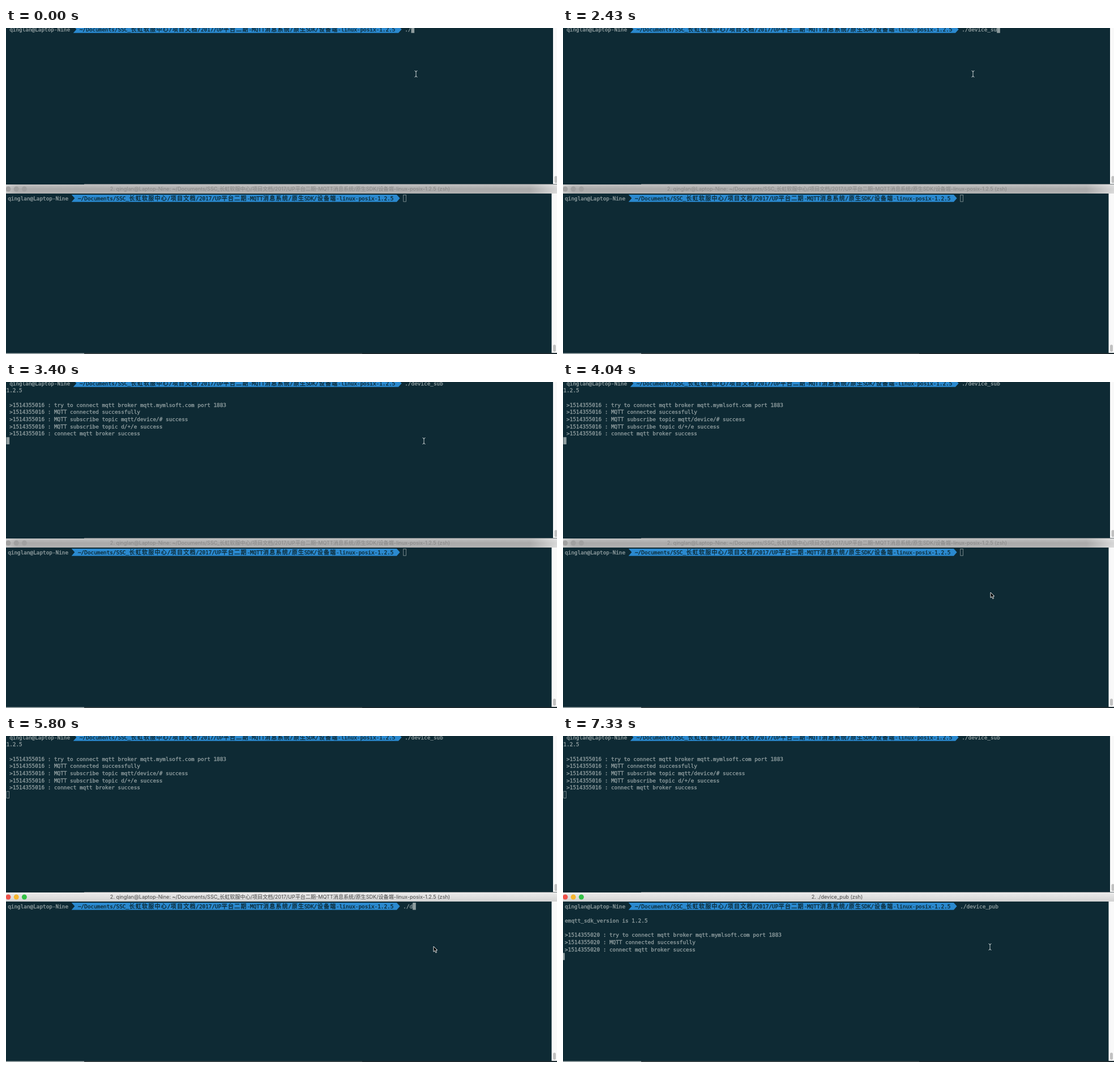
Recreate the animation shown at these times as an HTML page with a canvas. Size 973x575 px, loop 8000 ms.

```html
<!DOCTYPE html>
<html lang="en">
<head>
<meta charset="utf-8">
<title>Two terminals</title>
<style>
html, body { margin: 0; width: 100%; height: 100%; overflow: hidden; background: #0e2a34; }
canvas { display: block; }
</style>
</head>
<body>
<canvas id="stage" width="973" height="575"></canvas>
<script>
const ctx = document.getElementById('stage').getContext('2d');
const LOOP = 8000, CELL = 5.63, ROW = 12.65;
const BG = '#0e2a34', INK = '#8f9d9f', BLUE = '#2a89cf';
const USER = 'qinglan@Laptop-Nine';
const PATH = '~/Documents/SSC_长虹软服中心/项目文档/2017/UP平台二期-MQTT消息系统/原生SDK/设备端-linux-posix-1.2.5';
const COMMAND_COL = 125;

// [start time, value] steps; the latest one that has started applies
const topTyping = [[0, './'], [180, './d'], [390, './de'], [1290, './dev'], [1530, './device_'],
  [2190, './device_s'], [2430, './device_su'], [2660, './device_sub ']];
const bottomTyping = [[0, ''], [5060, '.'], [5270, './'], [5800, './d'], [5980, './de'],
  [6160, './device_'], [6460, './device_p'], [6760, './device_pu'], [6880, './device_pub ']];

const topStamp = ' >1514355016 : ', bottomStamp = ' >1514355020 : ';
const connecting = 'try to connect mqtt broker mqtt.mymlsoft.com port 1883';
const connected = 'MQTT connected successfully', ready = 'connect mqtt broker success';
// [start time, row, text]
const topOutput = [
  [3020, 1, '1.2.5'],
  [3020, 3, topStamp + connecting],
  [3110, 4, topStamp + connected],
  [3230, 5, topStamp + 'MQTT subscribe topic mqtt/device/# success'],
  [3230, 6, topStamp + 'MQTT subscribe topic d/+/e success'],
  [3230, 7, topStamp + ready]];
const bottomOutput = [
  [7180, 2, ' emqtt_sdk_version is 1.2.5'],
  [7180, 4, bottomStamp + connecting],
  [7240, 5, bottomStamp + connected],
  [7240, 6, bottomStamp + ready]];

const pointer = [[0, [724, 81]], [3400, [738, 104]], [3460, [768, 150]], [3520, [802, 186]],
  [3580, [818, 208]], [3750, [817, 224]], [3808, [811, 254]], [3866, [799, 292]],
  [3924, [780, 336]], [3982, [764, 364]], [4040, [755, 371]], [6760, [754, 372]]];

const at = (steps, t) => steps.filter(s => s[0] <= t).pop()[1];

function rect(x, y, w, h, fill) {
  ctx.fillStyle = fill;
  ctx.fillRect(x, y, w, h);
}

function polygon(points, fill, stroke) {
  ctx.beginPath();
  points.forEach(([x, y]) => ctx.lineTo(x, y));
  ctx.closePath();
  ctx.fillStyle = fill;
  ctx.fill();
  if (stroke) {
    ctx.strokeStyle = stroke;
    ctx.stroke();
  }
}

function dot(x, y, r, fill) {
  ctx.beginPath();
  ctx.arc(x, y, r, 0, 7);
  ctx.fillStyle = fill;
  ctx.fill();
}

// Text on the terminal grid, slightly thickened: wide characters take two cells
function gridText(text, x, y, color) {
  ctx.fillStyle = ctx.strokeStyle = color;
  ctx.lineWidth = 0.35;
  ctx.textAlign = 'left';
  for (const ch of text) {
    const wide = ch > '\u2e80';
    ctx.font = wide ? '10px "Noto Sans CJK SC", "Noto Sans CJK", sans-serif'
      : '9.35px "DejaVu Sans Mono", monospace';
    const left = x + (wide ? 0.5 : 0);
    ctx.fillText(ch, left, y + 9.6);
    ctx.strokeText(ch, left, y + 9.6);
    x += wide ? 2 * CELL : CELL;
  }
}

function terminal(x, y, typed, output, focused, t) {
  const left = x + 21 * CELL, right = x + 123 * CELL, mid = y + ROW / 2, bottom = y + ROW;
  gridText(USER, x + CELL, y, INK);
  polygon([[left, y], [right, y], [right + CELL, mid], [right, bottom], [left, bottom],
    [left + CELL, mid]], BLUE);
  gridText(PATH, x + 23 * CELL, y, BG);
  gridText(typed, x + COMMAND_COL * CELL, y, INK);

  const lines = output.filter(line => line[0] <= t);
  lines.forEach(([, row, text]) => gridText(text, x, y + row * ROW, INK));
  const row = lines.length ? lines.at(-1)[1] + 1 : 0;
  const col = row ? 0 : COMMAND_COL + typed.length;
  const cx = x + col * CELL, cy = y + row * ROW;
  if (focused) rect(cx, cy, CELL, ROW, INK);
  else {
    ctx.strokeStyle = INK;
    ctx.lineWidth = 0.8;
    ctx.strokeRect(cx + 0.5, cy + 0.5, CELL - 1, ROW - 1);
  }
}

function scrollbar(x, y, h, thumbX, thumbY) {
  rect(x, y, 973 - x, h, '#f9f9f9');
  ctx.fillStyle = '#c1c1c1';
  ctx.beginPath();
  ctx.roundRect(thumbX, thumbY, 5, 12.5, 2.5);
  ctx.fill();
}

function gradientBar(colors, x2, y2) {
  const shade = ctx.createLinearGradient(0, 276, x2, y2);
  colors.forEach(([stop, color]) => shade.addColorStop(stop, color));
  rect(0, 276, 973, 16, shade);
}

function titleBar(active, title) {
  if (active) gradientBar([[0, '#ececec'], [1, '#d2d2d2']], 0, 292);
  else {
    gradientBar([[0, '#c2c2c2'], [0.5, '#a9a9a9'], [1, '#b2b2b2']], 0, 292);
    gradientBar([[0, '#fff4'], [0.02, '#fff0'], [0.95, '#fff0'], [1, '#fff8']], 973, 276);
  }
  ['#f0524b', '#f6b62f', '#32c146'].forEach((color, i) =>
    dot(4 + 14.2 * i, 284, 4.5, active ? color : '#a0a0a0'));
  ctx.font = '9.1px Inter, "Noto Sans CJK SC", sans-serif';
  ctx.textAlign = 'center';
  ctx.fillStyle = active ? '#454545' : '#878787';
  ctx.fillText(title, 484, 287.4);
}

function iBeam(x, y) {
  ctx.beginPath();
  for (const s of [-1, 1]) {
    ctx.moveTo(x - 2.5, y + 5.5 * s);
    ctx.quadraticCurveTo(x, y + 5.5 * s, x, y + 3.5 * s);
    ctx.quadraticCurveTo(x, y + 5.5 * s, x + 2.5, y + 5.5 * s);
  }
  ctx.moveTo(x, y - 4);
  ctx.lineTo(x, y + 4);
  ctx.strokeStyle = '#d3dadb';
  ctx.lineWidth = 0.9;
  ctx.stroke();
}

function arrow(x, y) {
  ctx.lineWidth = 1;
  polygon([[0, 0], [0, 9.5], [2.2, 7.5], [3.9, 11.3], [5.6, 10.6], [4, 6.9], [6.8, 6.8]]
    .map(([dx, dy]) => [x + dx, y + dy]), '#000', '#e3e6e7');
}

function draw(t) {
  rect(0, 0, 973, 575, BG);
  const bottomActive = t >= 4340;
  terminal(0.5, -3.9, at(topTyping, t), topOutput, !bottomActive, t);
  terminal(-2.5, 294, at(bottomTyping, t), bottomOutput, bottomActive, t);
  scrollbar(966, 0, 275, 968.5, 261);
  scrollbar(963.5, 292, 281, 966, 558.5);
  rect(138, 275, 835, 1, '#70797c');
  titleBar(bottomActive, t < 7330 ? `2. ${USER}: ${PATH} (zsh)` : '2. ./device_pub (zsh)');
  rect(0, 573.5, 138, 1.5, '#aab2b3');
  rect(138, 573.5, 491, 1.5, '#41484a');
  rect(629, 573.5, 344, 1.5, '#20292c');

  const [x, y] = at(pointer, t);
  (y > 276 && t < 6760 ? arrow : iBeam)(x, y);
}

function tick() {
  draw(performance.now() % LOOP);
  requestAnimationFrame(tick);
}
tick();
</script>
</body>
</html>
```
